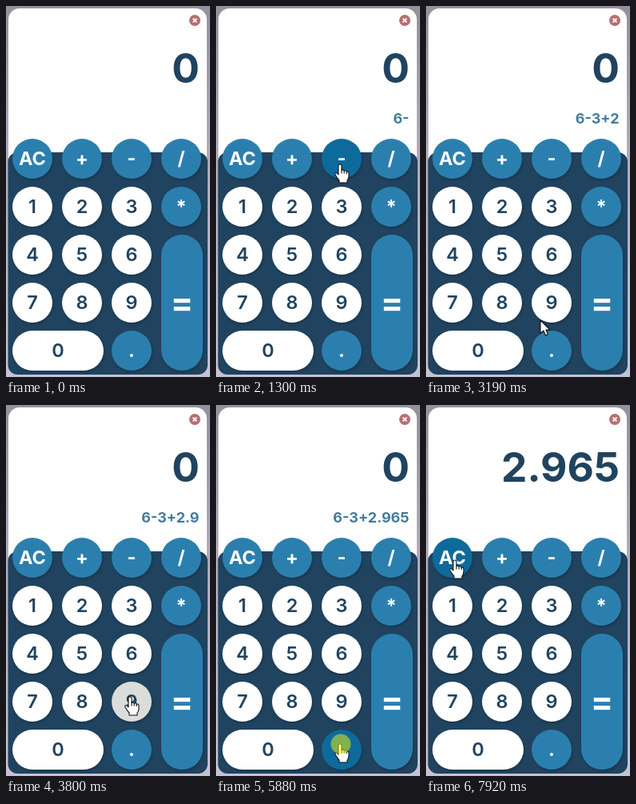
Animation of 255x464 px, one loop 8000 ms. Source, as an HTML page:

```html
<!DOCTYPE html>
<html lang="en">
<head>
<meta charset="utf-8">
<title>Calculator</title>
<style>
  html, body { margin: 0; width: 100%; height: 100%; overflow: hidden; background: #b5afc0; }
  svg { display: block; width: 255px; height: 464px; font-family: Inter, Roboto, sans-serif; font-weight: 700; }
  .key { filter: drop-shadow(1px 2px 1.5px #0003); }
  .key rect { fill: #2b7fae; }
  .key text { fill: #fff; font-size: 23.5px; text-anchor: middle; }
  .key.num rect { fill: #fff; }
  .key.num text { fill: #20435f; font-weight: 600; }
  .key.over rect { fill: #0f6a9c; }
  .key.num.over rect { fill: #dadddb; }
  .key .wide { font-size: 42px; }
  #result { font-size: 51.5px; fill: #20435f; text-anchor: end; }
  #entry { font-size: 18px; fill: #437c99; text-anchor: end; }
  .pointer { fill: #fff; stroke: #111; stroke-width: 1.1; stroke-linejoin: round; }
</style>
</head>
<body>
<svg viewBox="0 0 255 464">
  <defs>
    <linearGradient id="desk" x2="0" y2="1">
      <stop offset="0" stop-color="#958f9e"/>
      <stop offset=".4" stop-color="#b0aaba"/>
      <stop offset="1" stop-color="#c6c2d6"/>
    </linearGradient>
  </defs>
  <rect width="255" height="464" fill="url(#desk)"/>
  <rect x="3" y="3" width="248" height="458" rx="14" fill="#fff"/>
  <rect x="2.5" y="183" width="249.5" height="278" rx="12" fill="#20435f"/>
  <circle cx="236" cy="18" r="7" fill="#b86f70"/>
  <path d="M233.6 15.6l4.8 4.8m0-4.8l-4.8 4.8" stroke="#fff" stroke-width="1.9"/>
  <text id="result" x="242" y="95.5"></text>
  <text id="entry" x="241.5" y="147"></text>
  <g id="keys"></g>
  <g id="cursor">
    <path id="arrow" class="pointer" d="M0 0V16.5L4 13L6.5 19L9.3 17.8L7 12H12Z"/>
    <g id="hand" class="pointer">
      <path d="M-2 1.6Q-2 0 0 0T2 1.6V7.4Q4.2 6.2 5.2 8Q7.4 7.2 8.2 9Q10.7 8.6 11 10.8V15Q10.7 18 9 20V23H-1V20Q-3 18 -5.5 13.8Q-7 11.4 -5.5 10.8Q-4 10.2 -2 13Z"/>
      <path d="M2 7.4V11.5M5.2 8V11.5M8.2 9V12" fill="none"/>
    </g>
    <circle id="press" cx="1" r="12.5" fill="#ff0" opacity=".48"/>
  </g>
</svg>
<script>
const LOOP = 8000, TAP = 80, TAP_LENGTH = 50;
const $ = id => document.getElementById(id);

function node(tag, attrs, parent) {
  const el = document.createElementNS("http://www.w3.org/2000/svg", tag);
  for (const name in attrs) el.setAttribute(name, attrs[name]);
  return parent.appendChild(el);
}

const keys = {};

function addKey(label, cx, cy, w = 50, h = 50) {
  const el = node("g", { class: /\d/.test(label) ? "key num" : "key" }, $("keys"));
  const wide = label === "=";
  node("rect", { x: cx - w / 2, y: cy - h / 2, width: w, height: h, rx: Math.min(w, h) / 2 }, el);
  node("text", { x: cx, y: cy + (wide ? 15 : 8), class: wide ? "wide" : "" }, el).textContent = label;
  keys[label] = { el, cx, cy, w, h };
}

["AC + - /", "1 2 3 *", "4 5 6", "7 8 9"].forEach((row, r) =>
  row.split(" ").forEach((label, c) => addKey(label, 33 + 62 * c, 191 + 60 * r)));
addKey("0", 65, 431, 114);
addKey(".", 157, 431);
addKey("=", 220, 371, 52, 170);

// A visit: the key, the arrival time and where on the key the pointer rests
const visit = (label, at, dx = -2, dy = 6) =>
  ({ label, at, tap: at + TAP, done: at + TAP + TAP_LENGTH, x: keys[label].cx + dx, y: keys[label].cy + dy });

const enter = { x: 240, y: 464, done: 100 };
const visits = [
  { ...visit("3", 280), tap: Infinity },
  visit("6", 610), visit("-", 1060), visit("3", 1480),
  visit("+", 2100), visit("2", 2470), visit(".", 3293, -2, -7),
  visit("9", 3620), visit("6", 3930), visit("5", 4350, -8, -8),
  visit(".", 5210, -2, -7), visit(".", 5790, -2, -7),
  visit("-", 6330), visit("3", 6620),
  visit("=", 6890, -15, -47), visit("AC", 7920, 3, 3)
];

// Rest on a key, then glide to the next; longer ways take more time
function pointerAt(t) {
  const i = visits.findIndex(v => v.at > t);
  if (i < 0) return visits[visits.length - 1];
  const to = visits[i], from = visits[i - 1] || enter;
  const dx = to.x - from.x, dy = to.y - from.y;
  const start = Math.max(from.done, to.at - 100 - 1.5 * Math.hypot(dx, dy));
  const u = Math.max(0, (t - start) / (to.at - start));
  const e = u * u * (3 - 2 * u);
  return { x: from.x + dx * e, y: from.y + dy * e };
}

function calculate(t) {
  let entry = "", result = "0";
  for (const { label, tap, done } of visits) {
    if (tap === Infinity || done > t) continue;
    if (label === "=") {
      const sum = entry.match(/-?[\d.]+/g).reduce((total, n) => total + Number(n), 0);
      result = String(Number(sum.toFixed(6)));
      entry = "";
    } else if (label !== "." || !/\.\d*$/.test(entry)) {
      entry += label;
    }
  }
  return { entry, result };
}

function inside(k, x, y) {
  const r = Math.min(k.w, k.h) / 2;
  const dx = Math.max(Math.abs(x - k.cx) - k.w / 2 + r, 0);
  const dy = Math.max(Math.abs(y - k.cy) - k.h / 2 + r, 0);
  return Math.hypot(dx, dy) <= r;
}

const show = (el, on) => el.setAttribute("visibility", on ? "visible" : "hidden");

function draw(t) {
  const { entry, result } = calculate(t);
  $("result").textContent = result;
  $("entry").textContent = entry;

  const present = t >= enter.done;
  const { x, y } = pointerAt(t);
  let over = false;
  for (const k of Object.values(keys)) {
    const hit = present && inside(k, x, y);
    k.el.classList.toggle("over", hit);
    over = over || hit;
  }
  $("cursor").setAttribute("transform", `translate(${Math.round(x)} ${Math.round(y)})`);
  show($("hand"), present && over);
  show($("arrow"), present && !over);
  show($("press"), visits.some(v => t >= v.tap && t < v.done));
}

function frame() {
  draw(performance.now() % LOOP);
  requestAnimationFrame(frame);
}
frame();
</script>
</body>
</html>
```
